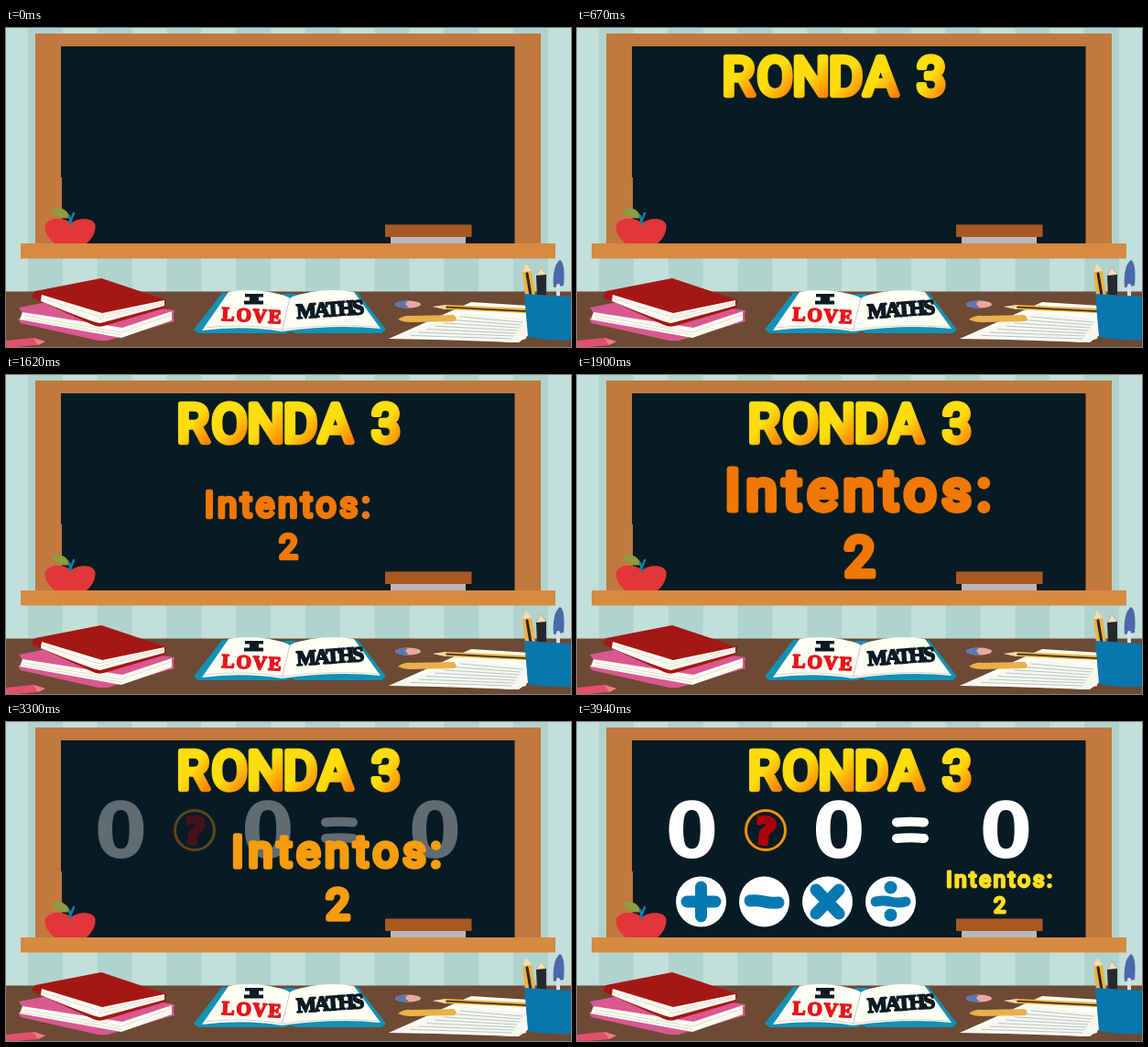
An HTML page for the animation above (5.07 s loop, 617 px wide and 348 px high).

```html
<!DOCTYPE html>
<html lang="es">
<head>
<meta charset="utf-8">
<title>Ronda 3</title>
<style>
html, body { margin: 0; width: 100%; height: 100%; overflow: hidden; }
svg { display: block; width: 100vw; height: 100vh; }
text { text-anchor: middle; stroke-linejoin: round; }
#title, #tries { font-family: Roboto, sans-serif; font-weight: 400; }
#title { font-size: 57px; stroke-width: 6.5; }
#tries { font-size: 62px; stroke-width: 7; }
#sum { font: bold 83px "DejaVu Sans", sans-serif; fill: #fff; }
#sum .ask { font-size: 39px; fill: #ab0408; stroke: #ab0408; stroke-width: 4.5; }
.letters { font-family: "Liberation Serif", serif; font-weight: bold; stroke-width: 1.8; }
.round { fill: none; stroke-linecap: round; stroke-linejoin: round; }
</style>
</head>
<body>
<svg viewBox="0 0 617 348" preserveAspectRatio="none">
  <defs>
    <linearGradient id="gold" x1=".5" y1=".48" x2=".8" y2=".9">
      <stop offset="0" stop-color="#ffdc0b"/>
      <stop offset="1" stop-color="#ff8208"/>
    </linearGradient>
    <pattern id="stripes" x="24" width="75.740" height="348" patternUnits="userSpaceOnUse">
      <rect width="75.740" height="348" fill="#c3dfda"/>
      <rect width="37.870" height="348" fill="#afd4ce"/>
    </pattern>
  </defs>

  <rect width="617" height="348" fill="url(#stripes)"/>
  <rect y="287.500" width="617" height="61" fill="#6c4a34"/>
  <rect x="32" y="6" width="552" height="230" fill="#c1793d"/>
  <path d="M60 20H555.500V235H61V163H60Z" fill="#071b25"/>
  <rect x="16" y="235" width="584" height="16.500" fill="#d78a42"/>

  <g id="apple">
    <path d="M71 213C64 206 45 206 42.500 216C42 223 47 230 53 235H88C94 230 98 223 97.500 215C95 206 78 207 71 213Z" fill="#e23639"/>
    <path d="M50 198C58 194 67 197 70 207C61 209 54 206 50 198Z" fill="#8d9c3f"/>
    <path d="M71 214L69 205M70 212L74 202" class="round" stroke="#137fa6" stroke-width="2.500"/>
  </g>

  <g id="sum" opacity="0">
    <text x="125.500" y="148">0</text>
    <text x="286" y="148">0</text>
    <text x="468.500" y="148">0</text>
    <path d="M349 109.500Q364 108 379 109.500M349 127Q364 125.500 379 127" class="round" stroke="#fff" stroke-width="10"/>
    <circle cx="206" cy="118" r="21.500" fill="none" stroke="#f79409" stroke-width="3"/>
    <text class="ask" x="206" y="133" transform="rotate(7 206 118)">?</text>
  </g>

  <g id="ops">
    <g fill="#fff">
      <circle cx="-103.500" r="27.500"/><circle cx="-34.500" r="27.500"/>
      <circle cx="34.500" r="27.500"/><circle cx="103.500" r="27.500"/>
    </g>
    <g class="round" stroke="#0779b1" stroke-width="13">
      <path d="M-119 0H-88M-103.500 -16V16"/>
      <path d="M-50 -1Q-42 -2 -34.500 0T-19 1"/>
      <path d="M22 -13L47 13M47 -13L22 13"/>
      <path d="M87 0Q95 -2 103.500 0T120 0" stroke-width="11"/>
      <path d="M103.500 -15.500h.01M103.500 14.500h.01" stroke-width="14"/>
    </g>
  </g>

  <g id="tries">
    <text x="161.500" y="146.500" style="text-anchor:start;letter-spacing:6.200px">Intentos:</text>
    <text x="308.500" y="218.500" font-size="59">2</text>
  </g>
  <g id="title" fill="url(#gold)" stroke="url(#gold)"></g>

  <rect x="420" y="227" width="82" height="8" fill="#b8b7bb"/>
  <rect x="414" y="214.500" width="94.500" height="13.500" fill="#a9581f"/>

  <g id="books">
    <path d="M14 305L75 293L184 308Q182 316 184 320L111 341Q103 342 96 340L16 322L13 317L22 316Z" fill="#d9588f"/>
    <path d="M18 310L127 327L181 309V319L126 338L15 318Z" fill="#fffdf3"/>
    <path d="M20 314L126 332L180 313M20 317L126 335" class="round" stroke="#d3d0c5" stroke-width=".7"/>
    <path d="M32 287L104 273L176 297Q172 301 175 305L107 325Q101 327 95 324L29 294Q28 290 32 287Z" fill="#a51715"/>
    <path d="M39 291L105 311L173 297V303L103 322Q94 321 38 298Z" fill="#fffdf3"/>
    <path d="M40 295L102 315L172 299M101 318L171 301" class="round" stroke="#d3d0c5" stroke-width=".7"/>
    <path d="M0 341L30 338L43 342L35 346L0 349Z" fill="#e2506c"/>
    <path d="M30 338L43 342L35 346Z" fill="#ef7d86"/>
  </g>

  <g id="reader">
    <path d="M236 289L205 329L210 333H305L311 331L317 333H410L415 329L384 289L312 291Z" fill="#1391b5"/>
    <path d="M243 288Q277 282 310 294L301 331Q259 324 214 330Z" fill="#fffef3"/>
    <path d="M310 294Q345 282 380 288L409 328Q360 323 301 331Z" fill="#fffef3"/>
    <path d="M303 290L310 295L317 290Z" fill="#1391b5"/>
    <path d="M310 295L301 331M216 327Q262 322 301 329Q355 322 407 326" class="round" stroke="#c8cac4" stroke-width=".8"/>
    <path d="M261 290H281V293.500H276V297.500H281V301.500H260V297.500H266V293.500H261Z" fill="#0c1b24"/>
    <g class="letters">
      <text x="269" y="320.500" font-size="21" letter-spacing="1.800" fill="#e6151b" stroke="#e6151b" transform="rotate(3 269 314)">LOVE</text>
      <text x="353" y="314.500" font-size="23" letter-spacing="-2.200" fill="#0c1b24" stroke="#0c1b24" transform="rotate(-4 353 306)">MATHS</text>
    </g>
  </g>

  <g id="papers">
    <path d="M418 339L508 299L572 303V334L560 343L470 340Z" fill="#fffef6"/>
    <path d="M418 339L500 311L570 318L568 339L552 343L478 337Z" fill="#f8f7ee"/>
    <path id="lines" class="round" stroke="#9dbdb9" stroke-width=".8"/>
    <path d="M428 318Q435 313 443 314L489 313Q494 317 490 320L442 321Q434 321 428 318Z" fill="#eab04a"/>
    <path d="M466 304L481 302L568 306V311L480 307Z" fill="#efaf3d"/>
    <path d="M466 304L481 302L480 307Z" fill="#f4d8ac"/>
    <path d="M481 304.500L568 309" class="round" stroke="#2a2523" stroke-width="1.500"/>
    <ellipse cx="439" cy="301.500" rx="14" ry="4" fill="#e9a9a3"/>
    <path d="M439 297.500A14 4 0 0 0 433 305L440 305.500L436 301Z" fill="#5a78b4"/>
    <path d="M433 298Q425 299 425 302Q427 305 436 305.500Z" fill="#5a78b4"/>
  </g>

  <g id="cup">
    <path d="M564 266L568 257L574 265L578 292H567Z" fill="#efb13f"/>
    <path d="M564 266L568 257L574 265Z" fill="#f5dcb5"/>
    <path d="M569 268L573 292" class="round" stroke="#292623" stroke-width="3"/>
    <path d="M579 270L584 261L590 269V293H580Z" fill="#26292c"/>
    <path d="M579 270L584 261L590 269Z" fill="#f5dcb5"/>
    <path d="M598 283Q596 260 605 253Q611 256 609 281Z" fill="#4a69aa"/>
    <path d="M603 281V294" class="round" stroke="#d9dfe3" stroke-width="4"/>
    <path d="M566 290L617 293V340Q590 341 570 337Z" fill="#0877ae"/>
  </g>
</svg>
<script>
const LOOP = 5070;
const $ = id => document.getElementById(id);
const set = (id, name, value) => $(id).setAttribute(name, value);

const spots = { R: 204, O: 244, N: 283.5, D: 321.5, A: 359.5, 3: 415 };
$("title").innerHTML = [..."RONDA3"]
  .map(c => `<text x="${spots[c]}" y="72.7">${c}</text>`).join("");

let rules = "";
for (let i = 0; i < 7; i++) rules += `M${496 - i * 9} ${315 + i * 3.4}L${564 - i * 2} ${321 + i * 3}`;
set("lines", "d", rules);

// Progress 0..1 in n even jumps, the first at start and the last at end.
function steps(t, start, end, n) {
  const k = Math.floor((t - start) / ((end - start) / (n - 1)) + 1e-6) + 1;
  return Math.min(n, Math.max(0, k)) / n;
}
const sineOut = p => Math.sin(p * Math.PI / 2);
const cubicOut = p => 1 - (1 - p) ** 3;
const cubicInOut = p => p < .5 ? 4 * p ** 3 : 1 - 4 * (1 - p) ** 3;
const mix = (a, b, p) => a + (b - a) * p;

const orange = [241, 120, 4], yellow = [255, 222, 32];

function draw(t) {
  const slide = cubicOut(steps(t, 390, 880, 8));
  set("title", "transform", `translate(${mix(-530, 0, slide)} 0)`);

  const grow = sineOut(steps(t, 1480, 1900, 7));
  const move = cubicInOut(steps(t, 3040, 3590, 9));
  const color = `rgb(${orange.map((c, i) => Math.round(mix(c, yellow[i], move)))})`;
  set("tries", "transform",
    `translate(${mix(308, 461.5, move)} ${mix(169, 188.7, move)}) scale(${grow * mix(1, .4, move)}) translate(-308 -169)`);
  set("tries", "fill", color);
  set("tries", "stroke", color);
  set("sum", "opacity", move);

  const pop = sineOut(steps(t, 3520, 3940, 7));
  set("ops", "transform", `translate(239 196) scale(${pop})`);
}

const begin = performance.now();
function tick() {
  draw((performance.now() - begin) % LOOP);
  requestAnimationFrame(tick);
}
tick();
</script>
</body>
</html>
```
